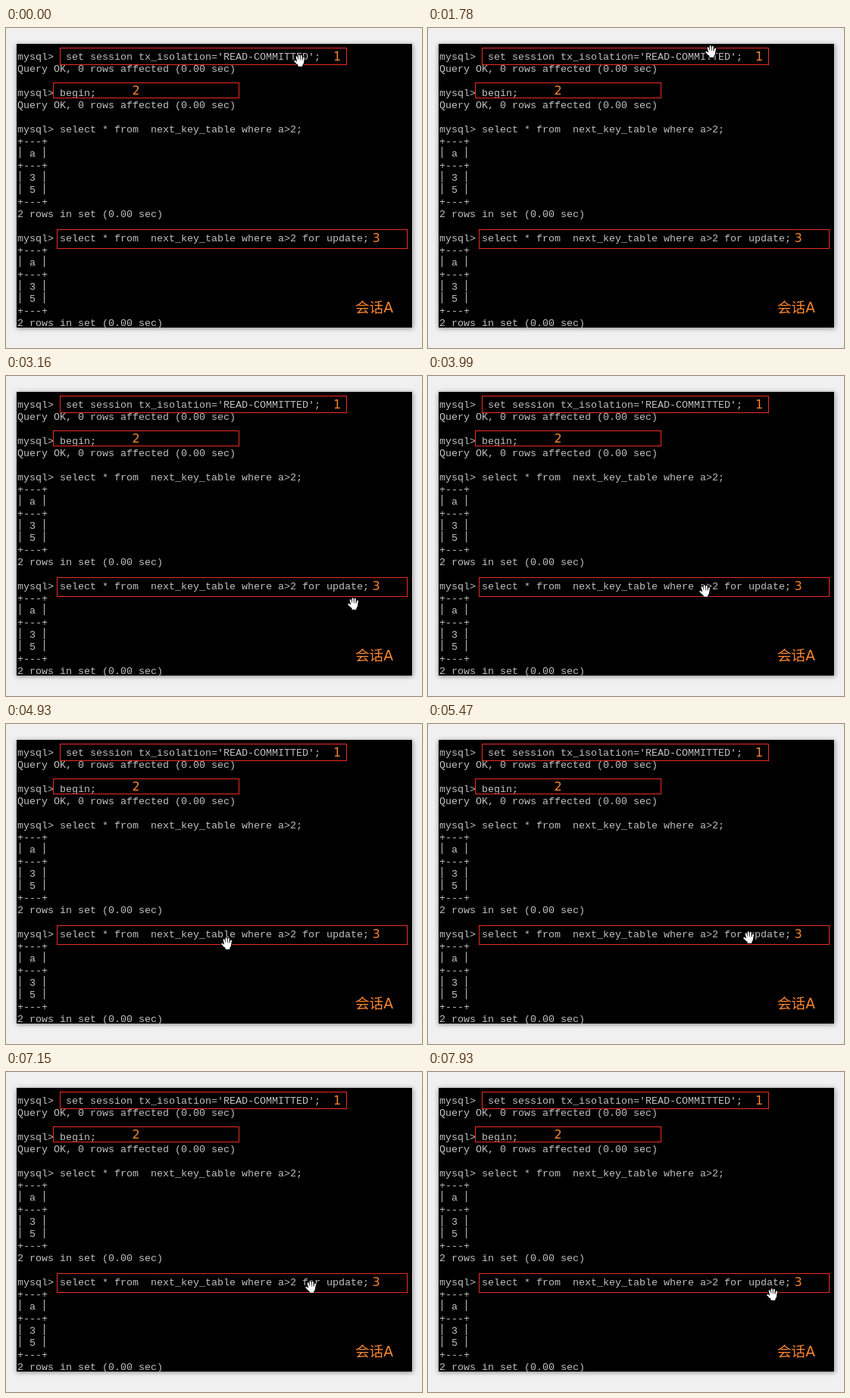
An HTML page with a canvas for the animation above (8000 ms loop, 549 px wide and 423 px high).

```html
<!DOCTYPE html>
<html lang="zh">
<head>
<meta charset="utf-8">
<title>Terminal session</title>
<style>
  html, body { margin: 0; width: 100%; height: 100%; overflow: hidden; background: #f0f0f0; }
  canvas { display: block; }
</style>
</head>
<body>
<canvas id="stage" width="549" height="423"></canvas>
<script>
const ctx = document.getElementById('stage').getContext('2d');
const LOOP = 8000, TICK = 130;
const CELL = 8, ROW = 16, LEFT = 15, BASE = 42;
const MONO = '13.33px "Liberation Mono", "Noto Sans Mono", monospace';
const NOTE = '"DejaVu Sans", "Noto Sans CJK SC", "Noto Sans CJK", sans-serif';

const ok = 'Query OK, 0 rows affected (0.00 sec)';
const rule = '+---+';
const table = [rule, '| a |', rule, '| 3 |', '| 5 |', rule, '2 rows in set (0.00 sec)'];
const query = 'mysql> select * from  next_key_table where a>2';
const lines = [
  "mysql>  set session tx_isolation='READ-COMMITTED';", ok, '',
  'mysql> begin;', ok, '',
  query + ';', ...table, '',
  query + ' for update;', ...table
];

// Pointer strokes: first step, last step, end point
const home = [380, 35];
const strokes = [
  [650, 1110, 386, 40],
  [1540, 1780, 366, 23],
  [1900, 2210, 246, 80],
  [2350, 2720, 248, 72],
  [2870, 3160, 451, 293],
  [3300, 3840, 403, 257],
  [3990, 3990, 358, 276],
  [4120, 4120, 284, 282],
  [5090, 5350, 438, 272],
  [5470, 5860, 396, 276],
  [6330, 6450, 432, 275],
  [6910, 7270, 394, 276],
  [7420, 7540, 444, 272],
  [7810, 7930, 447, 286]
];

const easeOut = u => 1 - (1 - u) ** 2.5;

// The pointer moves in visible steps, each stroke slowing towards its end.
function pointerAt(t) {
  let [x, y] = home;
  for (const [first, last, endX, endY] of strokes) {
    if (t < first) break;
    const gaps = Math.round((last - first) / TICK);
    const step = t >= last ? gaps : Math.floor((t - first) / (last - first) * gaps);
    const k = easeOut((step + 1) / (gaps + 1));
    x += (endX - x) * k;
    y += (endY - y) * k;
  }
  return [Math.round(x), Math.round(y)];
}

function drawWindow() {
  ctx.fillStyle = '#f0f0f0';
  ctx.fillRect(0, 0, 549, 423);
  ctx.save();
  ctx.shadowColor = 'rgba(0,0,0,.45)';
  ctx.shadowBlur = 6;
  ctx.shadowOffsetY = 1;
  ctx.fillStyle = '#000';
  ctx.fillRect(14, 21, 523, 375);
  ctx.restore();
  ctx.fillStyle = '#ddd';
  ctx.fillRect(536, 21, 1, 375);
}

function drawText() {
  ctx.font = MONO;
  ctx.textAlign = 'left';
  ctx.fillStyle = '#c0c0c0';
  lines.forEach((line, row) => {
    const y = BASE + row * ROW;
    ctx.fillText(line.replaceAll('|', ' '), LEFT, y);
    [...line].forEach((char, col) => {
      if (char === '|') ctx.fillRect(LEFT + col * CELL + 3, y - 13, 1, 15);
    });
  });
}

function note(text, x, y, size) {
  ctx.font = size + 'px ' + NOTE;
  ctx.textAlign = 'center';
  ctx.fillStyle = '#fa852e';
  ctx.fillText(text, x, y);
}

function frame(left, top, right, bottom) {
  ctx.lineWidth = 1;
  ctx.strokeStyle = '#ee2c23';
  ctx.strokeRect(left + .5, top + .5, right - left, bottom - top);
}

function drawNotes() {
  frame(71, 26, 449, 48);
  frame(62, 72, 307, 92);
  frame(67, 266, 529, 291);
  note('1', 437, 43, 16);
  note('2', 171.5, 88, 16);
  note('3', 488.5, 283, 16);
  note('会话A', 486, 376, 18.67);
}

const fingers = new Path2D('M3.6 3.2L5 8.5M6.6 1.3L7 8.5M9.7 1.8L9.5 8.5M12.9 4.5L12 10M1.3 8.8L4.5 12');
const palm = new Path2D('M4.2 7.5H12.9V11.5L11.3 14V15.8H5.5V14L3 11Z');

function drawHand(x, y) {
  ctx.save();
  ctx.translate(x, y);
  ctx.lineCap = ctx.lineJoin = 'round';
  ctx.strokeStyle = '#000';
  ctx.lineWidth = 4;
  ctx.stroke(fingers);
  ctx.lineWidth = 2;
  ctx.stroke(palm);
  ctx.strokeStyle = ctx.fillStyle = '#fff';
  ctx.stroke(fingers);
  ctx.fill(palm);
  ctx.restore();
}

function render(now) {
  const t = Math.max(0, now - start) % LOOP;
  drawWindow();
  drawText();
  drawNotes();
  drawHand(...pointerAt(t));
  requestAnimationFrame(render);
}

const start = performance.now();
render(start);
</script>
</body>
</html>
```
